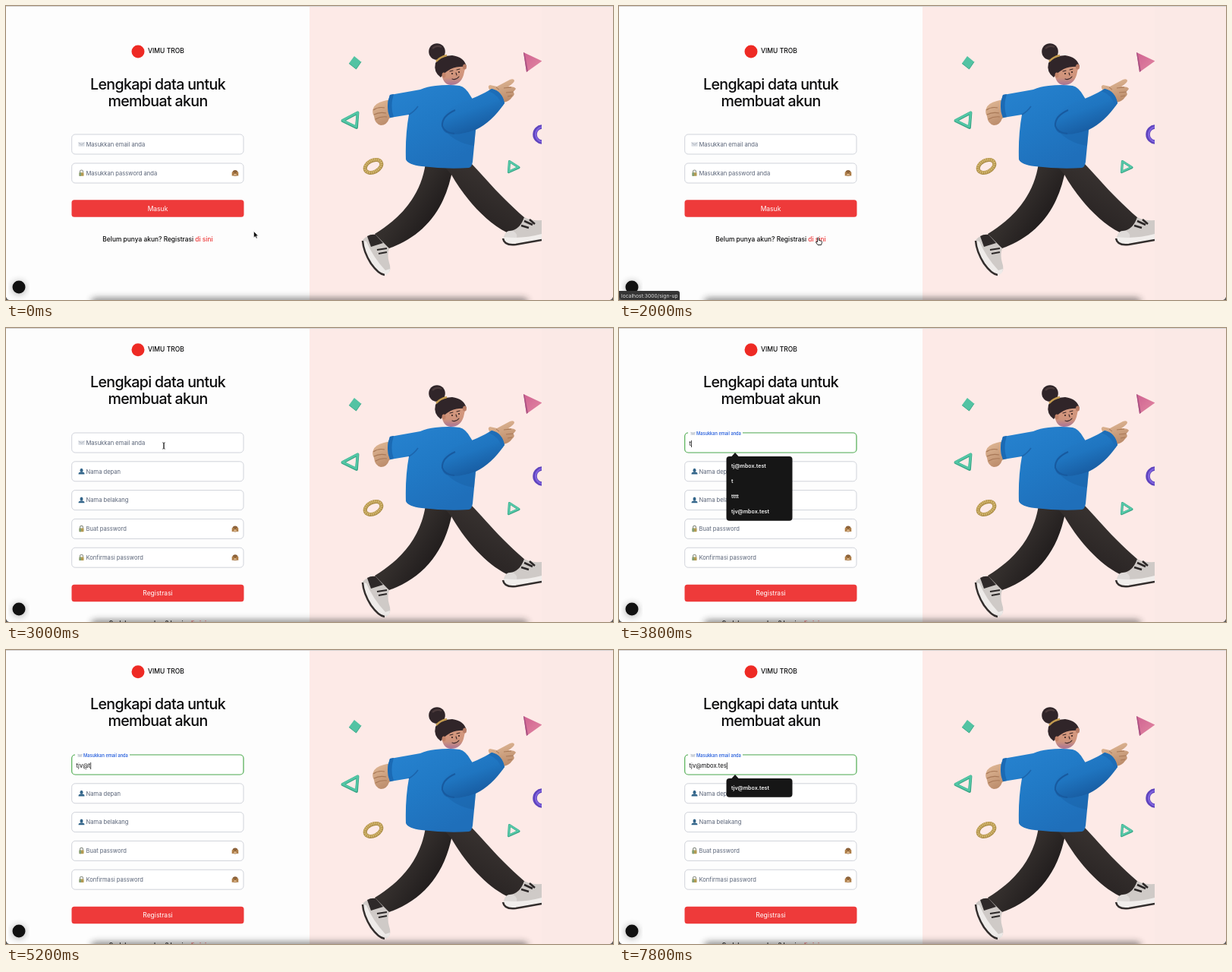
An HTML page that plays this animation: 800 by 387 pixels, repeating every 8000 ms.

```html
<!DOCTYPE html>
<html lang="id">
<head>
<meta charset="utf-8">
<title>Registrasi</title>
<style>
  html, body { margin: 0; width: 100%; height: 100%; overflow: hidden; background: #fdfdfd; }
  svg { display: block; width: 100%; height: 100%; }
  text { font-family: Inter, Roboto, sans-serif; font-size: 8.5px; fill: #0b0b0c; white-space: pre; }
  .mid { text-anchor: middle; }
  .title { font-size: 19.6px; font-weight: 500; letter-spacing: -.033em; text-anchor: middle; }
  .brand { font-weight: 500; }
  .hint { font-size: 7.6px; fill: #5a6478; }
  .link { font-size: 8.4px; font-weight: 500; text-anchor: middle; }
  .link tspan { fill: #ee3a3a; }
  .box { fill: #fff; stroke: #d0d3da; }
  .float { font-size: 5.7px; font-weight: 500; fill: #1a56db; }
  .typed { font-size: 7.65px; }
  .option { font-size: 7.1px; font-weight: 600; fill: #f4f4f4; }
  .status { font-size: 6.75px; fill: #dcdcdc; }
</style>
</head>
<body>
<svg viewBox="0 0 800 387" preserveAspectRatio="none">
  <defs>
    <linearGradient id="blue" x1="0" y1="0" x2=".6" y2="1">
      <stop offset="0" stop-color="#2783d0"/><stop offset=".5" stop-color="#217ac6"/><stop offset="1" stop-color="#1f6fba"/>
    </linearGradient>
    <linearGradient id="sleeve" x1="0" y1="0" x2=".5" y2="1">
      <stop offset="0" stop-color="#2680cd"/><stop offset=".55" stop-color="#1f75c0"/><stop offset="1" stop-color="#175a9f"/>
    </linearGradient>
    <linearGradient id="legBack" x1="0" y1="0" x2=".8" y2=".6">
      <stop offset="0" stop-color="#413b38"/><stop offset=".6" stop-color="#332e2c"/><stop offset="1" stop-color="#211d1d"/>
    </linearGradient>
    <linearGradient id="legFront" x1="1" y1="0" x2=".3" y2="1">
      <stop offset="0" stop-color="#403a37"/><stop offset="1" stop-color="#252020"/>
    </linearGradient>
    <linearGradient id="skin" x1="0" y1="0" x2=".4" y2="1">
      <stop offset="0" stop-color="#e4bd9b"/><stop offset="1" stop-color="#bd8e6d"/>
    </linearGradient>
    <linearGradient id="face" x1="0" y1="0" x2="0" y2="1">
      <stop offset="0" stop-color="#d79b80"/><stop offset=".65" stop-color="#cf937b"/><stop offset="1" stop-color="#a87396"/>
    </linearGradient>
    <linearGradient id="pink" x1="0" y1="0" x2="1" y2="1">
      <stop offset="0" stop-color="#cf6291"/><stop offset="1" stop-color="#e288a2"/>
    </linearGradient>
    <filter id="blur" x="-20%" y="-200%" width="140%" height="500%"><feGaussianBlur stdDeviation="4"/></filter>
    <clipPath id="picture"><rect x="400" y="-30" width="306" height="430"/></clipPath>

    <g id="mail"><rect x="-4" y="-2.6" width="8" height="5.4" rx=".5" fill="#d9dde3"/><path d="M-4-2.3L0 .8L4-2.3" fill="none" stroke="#a5abb5" stroke-width=".7"/></g>
    <g id="lock"><path d="M-2-.5V-2a2 2 0 0 1 4 0v1.5" fill="none" stroke="#8b9187" stroke-width="1.1"/><rect x="-3" y="-.8" width="6" height="4.6" rx=".6" fill="#b39b52"/><rect x="-3" y="-.8" width="2.5" height="4.6" rx=".6" fill="#7fa07a"/></g>
    <g id="user" fill="#33658a"><ellipse cy="-1.6" rx="2" ry="2.5"/><path d="M-4 3.7C-4 1-2 .8 0 .8S4 1 4 3.7Z"/></g>
    <g id="monkey"><path d="M-3.5-1.5Q-3-4 0-4T3.5-1.5V2Q3 4 0 4T-3.5 2Z" fill="#8a6038"/><ellipse cy="2" rx="2.2" ry="1.5" fill="#d9b183"/><path d="M-3.4 3.5V-.3H-.9M3.4 3.5V-.3H.9" fill="none" stroke="#b18048" stroke-width="1.8"/></g>
  </defs>

  <rect width="800" height="387" fill="#fdfdfd"/>
  <rect x="400" width="400" height="387" fill="#fdeae7"/>
  <rect x="706" width="94" height="387" fill="#fbe9e6"/>

  <g id="art"><g clip-path="url(#picture)">
    <!-- floating shapes -->
    <path d="M459 66L468 73.500L461.500 83L452 75.500Z" fill="#52c3a3"/>
    <path d="M452 75.500L461.500 83L468 73.500" fill="none" stroke="#3ba98a"/>
    <path d="M682 61L706.500 72.500L686 87Z" fill="url(#pink)"/><path d="M682 61L686 87L688 85.500L683.500 62Z" fill="#a95283"/>
    <g fill="none" stroke-linejoin="round">
      <path d="M443.500 151L463.500 140.500L462 160Z" stroke="#35a283" stroke-width="3.800"/>
      <path d="M443.500 150.500L463.500 140L461.500 159Z" stroke="#52c6a5" stroke-width="2.600"/>
      <path d="M663.500 204.500L676 212.500L662.500 218.500Z" stroke="#35a283" stroke-width="3.200"/>
      <path d="M663.500 204.500L675.500 212L662.500 218Z" stroke="#55c8a8" stroke-width="2.200"/>
      <g transform="rotate(-27 484 211)"><ellipse cx="484" cy="211" rx="11.500" ry="7.500" stroke="#a98a45" stroke-width="5"/><ellipse cx="484" cy="210.500" rx="11.500" ry="7.500" stroke="#d3b66d" stroke-width="3.600" stroke-dasharray="1.700 .8"/></g>
      <circle cx="707" cy="169" r="10" stroke="#5f44bd" stroke-width="5.500"/><circle cx="708" cy="169" r="10" stroke="#8065df" stroke-width="2"/>
    </g>

    <!-- legs and shoes -->
    <path d="M553 207C547 249 521 279 486 300Q492 313 505 319C550 303 580 268 589 212Z" fill="url(#legBack)"/>
    <path d="M576 209Q580 214 587 222C603 250 630 283 660 298Q676 299 684 279C650 250 628 222 613 207Z" fill="url(#legFront)"/>
    <path d="M470 308Q474 302 487 301L505 319Q502 328 505 338Q509 350 501 353Q495 354 489 346Z" fill="#cfcac7"/>
    <path d="M476 303Q481 300 487 301L497 312L481 317Z" fill="#2e2929"/>
    <path d="M471 309L475 310Q484 331 500 348L506 346Q506 354 498 354Q491 352 484 342Q472 325 471 309Z" fill="#eeebe9"/>
    <path d="M470 309Q471 323 481 339Q491 353 499 354" fill="none" stroke="#332e2d" stroke-width="2.500"/>
    <path d="M489 321L502 319M491 326L502 324" stroke="#2b2727" stroke-width="2"/>
    <path d="M656 305Q658 296 664 296Q677 295 683 278Q692 283 706 282V308L661 313Z" fill="#cfcac7"/>
    <path d="M657 302Q659 295 668 296Q676 300 672 307L659 310Z" fill="#dfdbd9"/>
    <path d="M679 289L689 292M683 283L694 288M690 281L697 287" stroke="#2b2727" stroke-width="2.500"/>
    <path d="M656 304Q680 307 706 300V308L662 314Q655 313 656 304Z" fill="#f1eeec"/>
    <path d="M655 306Q657 316 672 314L706 308" fill="none" stroke="#332e2d" stroke-width="2.500"/>

    <!-- hands -->
    <path d="M510 122L498 125Q486 128 484 135Q482 140 485 145Q486 155 494 157Q502 157 505 148L512 145Z" fill="url(#skin)"/>
    <path d="M484 137Q491 132 499 134M485 143Q492 139 501 141M487 149Q494 145 502 146" fill="none" stroke="#a87857" stroke-width="1.100"/>
    <path d="M639 113Q633 105 638 104L647 106L664 97Q669 95 670 98Q670 101 662 106Q671 106 672 109Q670 112 668 113Q672 116 667 120Q663 126 655 127Z" fill="url(#skin)"/>
    <path d="M656 108L666 107M659 114L669 113M661 119L667 118M646 107L650 110" fill="none" stroke="#a87857"/>

    <!-- sweater -->
    <path d="M566 105Q555 106 546 110L506 117Q500 132 506 147L531 143Q526 170 527 202Q530 209 548 211Q580 215 610 213Q614 212 615 205L619 163Q625 135 612 118Q606 107 598 105Q583 103 566 105Z" fill="url(#blue)"/>
    <path d="M506 117Q500 132 506 147L511 146Q506 132 511 116Z" fill="#1b6ab4"/>
    <path d="M531 143Q538 139 543 132" fill="none" stroke="#1d65ab" stroke-width="1.500"/>
    <path d="M575 160Q590 174 619 163L617 184Q590 180 575 160Z" fill="#165799" opacity=".3"/>
    <path d="M574 152Q578 137 598 128Q624 119 640 109Q654 112 657 128Q640 153 619 163Q594 172 580 167Q573 163 574 152Z" fill="url(#sleeve)"/>
    <path d="M592 137Q574 145 575 158Q578 167 591 168" fill="none" stroke="#185a9f" stroke-width="2"/>
    <path d="M640 109Q654 112 657 128L654 132Q650 117 636 112Z" fill="#1d6db7"/>

    <!-- head -->
    <path d="M574 84Q574 103 586 104Q599 104 603 91L606 78L584 76Z" fill="url(#face)"/>
    <circle cx="568" cy="60" r="10.800" fill="#302529"/>
    <path d="M562 56Q567 51 574 54" fill="none" stroke="#4b3b3c" stroke-width="2"/>
    <path d="M566 75Q573 65 588 65Q604 67 607 80Q595 79 586 83Q577 88 573 94Q563 87 566 75Z" fill="#302529"/>
    <path d="M567 73Q572 67 581 65" fill="none" stroke="#c39b50" stroke-width="2.500"/>
    <ellipse cx="604.500" cy="80" rx="2.500" ry="3.500" fill="#b97d66"/>
    <ellipse cx="577" cy="91" rx="2.500" ry="3.500" fill="#c4846a"/>
    <g fill="none" stroke="#3c2828" stroke-width="1.100" stroke-linecap="round"><path d="M585 86L589 85M594 84L598 83M588 96Q593 98 597 93M593 88L594 91"/></g>
    <circle cx="588" cy="89" r="1.100" fill="#33201f"/><circle cx="597" cy="87" r="1.100" fill="#33201f"/>
  </g></g>

  <g id="login"></g>
  <g id="signup"></g>

  <g id="focus">
    <rect x="86.700" y="138" width="226.300" height="26" rx="4.500" fill="#fff" stroke="#57b257" stroke-width="1.200"/>
    <rect x="91" y="136.500" width="72" height="3" fill="#fdfdfd"/>
    <use href="#mail" transform="translate(97.500 139) scale(.75)"/>
    <text class="float" x="102" y="141">Masukkan email anda</text>
    <text class="typed" id="typed" x="92.500" y="155.300"></text>
    <rect id="caret" y="148" width=".8" height="9" fill="#111"/>
  </g>
  <g id="menu">
    <path d="M148 169.500L153 164L158 169.500Z" fill="#161616"/>
    <rect id="menuBox" x="141.500" y="169" width="87" rx="4" fill="#161616"/>
    <g id="options"></g>
  </g>

  <rect id="scrollbar" x="795" y="1" width="3.800" height="357" rx="1.900" fill="#8b8485"/>
  <rect x="112" y="384" width="576" height="12" rx="6" fill="#222" opacity=".5" filter="url(#blur)"/>
  <circle cx="17" cy="371" r="9.500" fill="#222" opacity=".3" filter="url(#blur)"/>
  <circle cx="17" cy="370" r="8.500" fill="#111"/>
  <g id="status"><path d="M0 375H77Q80 375 80 378V387H0Z" fill="#353535"/><text class="status" x="3" y="383.500">localhost:3000/sign-up</text></g>

  <rect width="800" height="1" fill="#d4d2d2"/>
  <path d="M0 383V387H4Q1 386 0 383ZM800 383V387H796Q799 386 800 383Z" fill="#555"/>

  <g id="arrow"><path d="M0 0V8.500L2 6.700L3.400 9.600L4.800 9L3.500 6.200H6Z" fill="#111" stroke="#fff" stroke-width=".6"/></g>
  <g id="hand"><path d="M-1.500-3.500Q-.5-5 .4-3.500V-.5L3.700.3Q4.800.8 4.400 2.600L3.500 5.500H-1L-3.500 2Q-3.700.6-1.500 1.600Z" fill="#fff" stroke="#111" stroke-width=".9"/></g>
  <g id="beam"><path d="M-1.700-4.200Q0-4.200 0-3V3Q0 4.200-1.700 4.200M1.700-4.200Q0-4.200 0-3V3Q0 4.200 1.700 4.200" fill="none" stroke="#222" stroke-width=".9"/></g>
</svg>
<script>
const LOOP = 8000;
const HOVER = 1400, REGISTER = 2200, FOCUS = 3200;
const $ = id => document.getElementById(id);
const show = (id, on) => $(id).setAttribute('visibility', on ? 'visible' : 'hidden');
const move = (id, x, y) => $(id).setAttribute('transform', `translate(${x} ${y})`);

const header = y => `
  <circle cx="174" cy="${y}" r="8.500" fill="#ee2a24"/>
  <text class="brand" x="187" y="${y + 2}">VIMU TROB</text>
  <text class="title" x="200" y="${y + 49.5}">Lengkapi data untuk</text>
  <text class="title" x="200" y="${y + 71.5}">membuat akun</text>`;
const field = (y, icon, hint, secret) => `
  <rect class="box" x="86.700" y="${y - 13}" width="226.300" height="26" rx="4.500"/>
  <use href="#${icon}" x="99.500" y="${y}"/>
  <text class="hint" x="105.500" y="${y + 2.7}">${hint}</text>
  ${secret ? `<use href="#monkey" x="302" y="${y}"/>` : ''}`;
const button = (y, label) => `
  <rect x="86.500" y="${y - 11.3}" width="227" height="22.600" rx="3.500" fill="#ee3a3a"/>
  <text class="mid" x="200" y="${y + 3}" style="fill:#fff">${label}</text>`;
const link = (y, label) => `<text class="link" x="200" y="${y}">${label} <tspan>di sini</tspan></text>`;

$('login').innerHTML = header(60)
  + field(182, 'mail', 'Masukkan email anda')
  + field(220, 'lock', 'Masukkan password anda', true)
  + button(266.5, 'Masuk') + link(310, 'Belum punya akun? Registrasi');

$('signup').innerHTML = header(28.7) + [
  ['mail', 'Masukkan email anda'],
  ['user', 'Nama depan'],
  ['user', 'Nama belakang'],
  ['lock', 'Buat password', true],
  ['lock', 'Konfirmasi password', true]
].map((row, i) => field(151 + i * 37.8, ...row)).join('')
  + button(349, 'Registrasi') + link(391.5, 'Sudah punya akun? Login');

const saved = ['tj@mbox.test', 't', 'tttt', 'tjv@mbox.test'];
const typing = [
  [FOCUS, ''], [3800, 't'], [4000, 'tj'], [4400, 'tjv'], [4800, 'tjv@'],
  [5200, 'tjv@t'], [5400, 'tjv@tm'], [5600, 'tjv@t'], [5800, 'tjv@'],
  [6600, 'tjv@m'], [6800, 'tjv@mb'], [7000, 'tjv@mbo'], [7200, 'tjv@mbox'],
  [7400, 'tjv@mbox.'], [7600, 'tjv@mbox.te'], [7800, 'tjv@mbox.tes']
];
const pointer = [
  [0, 'arrow', 326.5, 296.5], [HOVER, 'hand', 263, 309], [REGISTER, 'beam', 262, 305],
  [2600, 'beam', 250, 260], [2800, 'beam', 225, 190], [3000, 'beam', 208, 155],
  [FOCUS, 'beam', 205, 152], [3800, 'none']
];
const at = (steps, t) => steps.findLast(step => step[0] <= t);

function showForm(t) {
  const registering = t >= REGISTER;
  show('login', !registering);
  show('signup', registering);
  move('art', 0, registering ? 26 : 0);
  show('scrollbar', registering && t < 3000);
  show('status', t >= HOVER && t < 2800);
}

function showTyping(t) {
  const [since, value] = at(typing, t) || [0, ''];
  const focused = t >= FOCUS;
  const matches = value ? saved.filter(entry => entry.startsWith(value)) : [];
  show('focus', focused);
  $('typed').textContent = value;
  $('caret').setAttribute('x', 92.7 + (value ? $('typed').getComputedTextLength() : 0));
  show('caret', focused && (t - since) % 1000 < 500);
  show('menu', matches.length > 0);
  $('menuBox').setAttribute('height', 24.8 + 20 * Math.max(0, matches.length - 1));
  $('options').innerHTML = matches
    .map((entry, i) => `<text class="option" x="148" y="${184 + i * 20}">${entry}</text>`).join('');
}

function showPointer(t) {
  const [, kind, x, y] = at(pointer, t);
  for (const id of ['arrow', 'hand', 'beam']) show(id, id === kind);
  if (kind !== 'none') move(kind, x, y);
}

const start = performance.now();
function draw() {
  const t = (performance.now() - start) % LOOP;
  showForm(t);
  showTyping(t);
  showPointer(t);
  requestAnimationFrame(draw);
}
draw();
</script>
</body>
</html>
```
